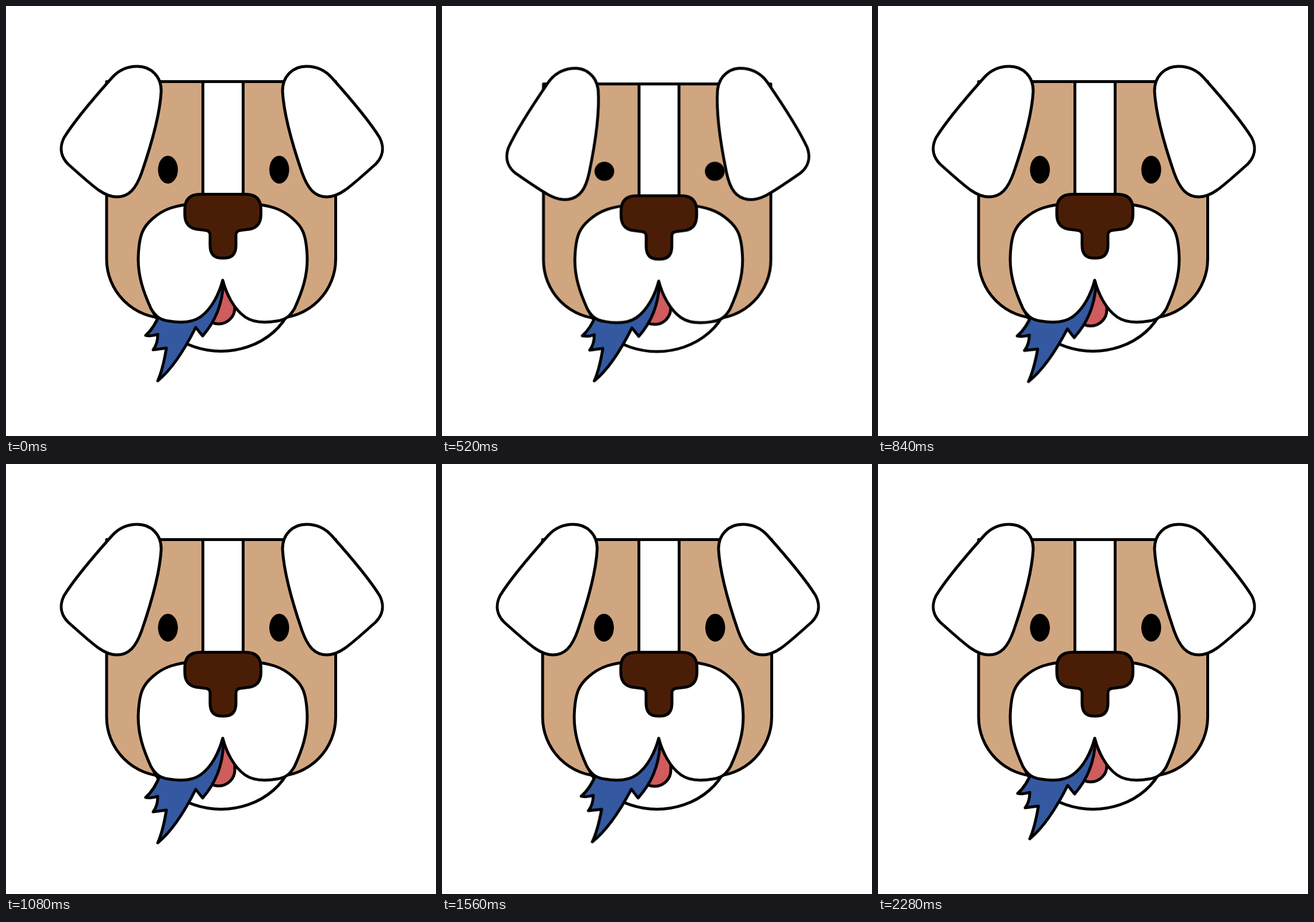
Animation of 748 by 748 pixels, one loop 2.32 s. Source, as an HTML page:

```html
<!DOCTYPE html>
<html lang="en">
<head>
<meta charset="utf-8">
<title>Dog</title>
<style>
  html, body { margin: 0; width: 100%; height: 100%; overflow: hidden; background: #fff; }
  svg { display: block; width: 100vw; height: 100vh; }
  .line { stroke: #000; stroke-width: 5; stroke-linejoin: round; stroke-linecap: round; }
  .white { fill: #fff; }
  .tan { fill: #d0a680; }
  .brown { fill: #4a1e06; }
  .pink { fill: #d05c5d; }
  .blue { fill: #3459a0; }

  .head, .ear, .eye, .tongue, .scrap { animation: 2320ms ease-in-out infinite; }
  .head { animation-name: bounce; transform-origin: 374px 675px; }
  .ear { animation-name: flap; transform-origin: 221px 138px; }
  .eye { animation-name: blink; animation-timing-function: linear; transform-box: fill-box; transform-origin: center; }
  .tongue { animation-name: loll; }
  .scrap { animation-name: swing; transform-origin: 373px 532px; }

  @keyframes bounce {
    0%, 34.48%, 100% { transform: scale(1); }
    12.07% { transform: scale(1.0226); }
    22.41% { transform: scale(.9925); }
    29.31% { transform: scale(1.004); }
  }
  @keyframes flap {
    0%, 8.62%, 34.48%, 100% { transform: rotate(0deg); }
    22.41% { transform: rotate(-7.3deg); }
  }
  @keyframes blink {
    0%, 20.69%, 31.03%, 77.16%, 87.5%, 100% { transform: scaleY(1); }
    25.86%, 82.33% { transform: scaleY(.1); }
  }
  @keyframes loll {
    0%, 25.86%, 94.83%, 100% { transform: translateY(0); }
    46.55%, 56.9% { transform: translateY(7px); }
    79.31% { transform: translateY(8.5px); }
  }
  @keyframes swing {
    0%, 25.86%, 94.83%, 100% { transform: translateY(0) rotate(0deg); }
    36.21% { transform: translateY(3.5px) rotate(1.1deg); }
    46.55%, 56.9% { transform: translateY(7px) rotate(0deg); }
    79.31% { transform: translateY(8.5px) rotate(2.8deg); }
  }
</style>
</head>
<body>
<svg viewBox="0 0 748 748">
  <defs>
    <path id="ear" d="M228 105C252 105 270 122 270 148C268 185 256 232 236 290C226 318 214 332 193 332C172 332 158 320 108 275C96 263 92 247 101 229C120 198 160 152 185 124C197 111 210 105 228 105Z"/>
  </defs>
  <g class="head">
    <path class="line tan" d="M175 131.5H573.5V440A103 103 0 0 1 470.5 543H278A103 103 0 0 1 175 440Z"/>
    <path class="line white" d="M342.5 131.5H412.5V340H342.5Z"/>
    <ellipse class="line white" cx="374" cy="489.5" rx="128" ry="111"/>

    <path class="line pink tongue" d="M342 470V525A28 28 0 0 0 398 525V470Z"/>
    <path class="line blue scrap" d="M268 534Q258 560 243 573Q254 575 264 571Q264 588 256 598L279 595Q273 632 264 652Q297 625 330 559L342 574Q376 535 378 482L377 465H350L290 520Z"/>

    <path class="line white" d="M377 477C371 500 358 527 338 541C322 552 300 551 283 548C268 546 260 540 252 526C238 495 230 470 230 440C231 395 240 383 255 370C275 352 295 347 330 343H424C459 347 479 352 499 370C514 383 523 395 524 440C524 470 516 495 502 526C494 540 486 546 471 548C454 551 432 552 416 541C396 527 383 500 377 477Z"/>
    <path class="line brown" d="M338 327.5H417Q443.5 327.5 443.5 354V362Q443.5 384 425 388L406 390.5Q400 392 400 398V416Q400 438.5 380 438.5H375Q355 438.5 355 416V398Q355 392 349 390.5L330 388Q311 384 311 362V354Q311 327.5 338 327.5Z"/>

    <ellipse class="eye" cx="281.7" cy="284.7" rx="17.3" ry="24.2"/>
    <ellipse class="eye" cx="475.3" cy="284.7" rx="17.3" ry="24.2"/>

    <use class="line white ear" href="#ear"/>
    <g transform="translate(751) scale(-1 1)"><use class="line white ear" href="#ear"/></g>
  </g>
</svg>
</body>
</html>
```
